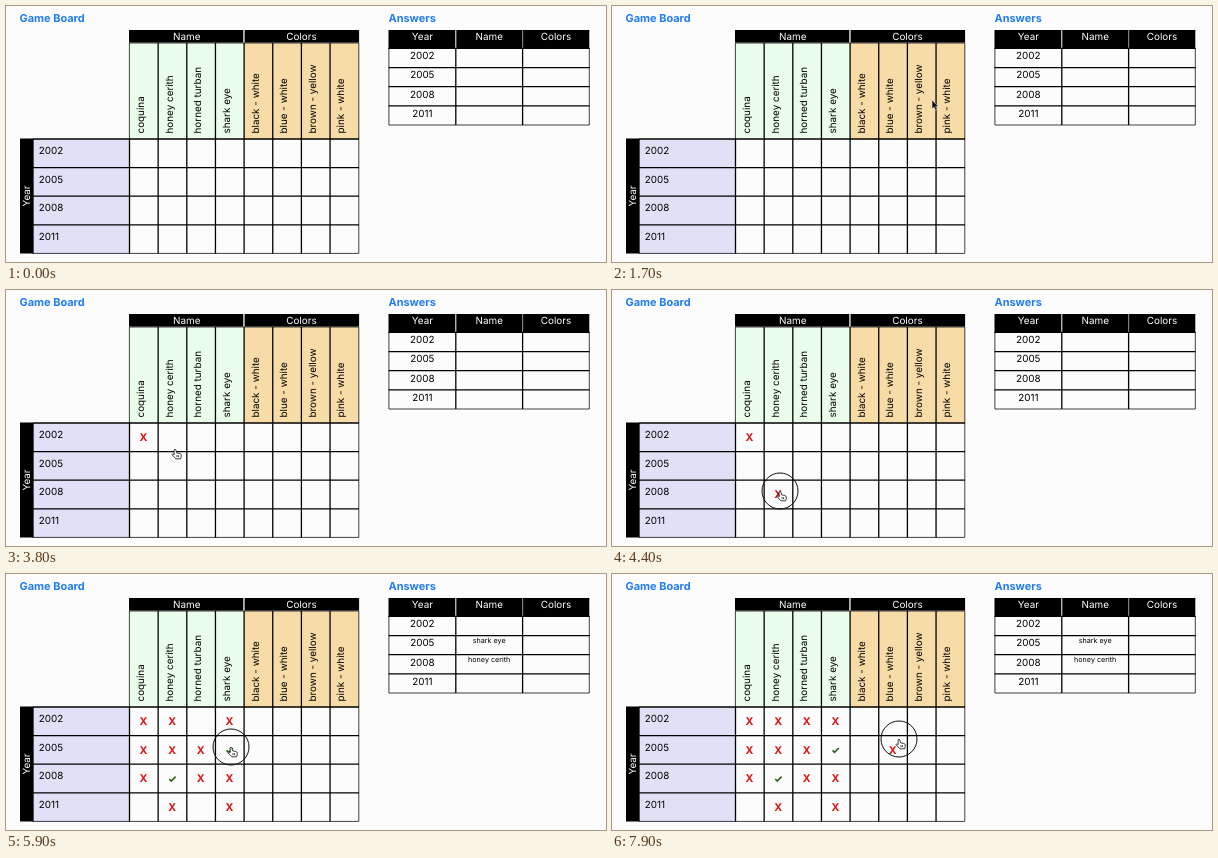
An HTML page for the animation above (8 s loop, 600 by 256 pixels).

```html
<!DOCTYPE html>
<html lang="en">
<head>
<meta charset="utf-8">
<title>Logic grid</title>
<style>
html, body { margin: 0; width: 100%; height: 100%; overflow: hidden; background: #fdfcfd; }
svg { display: block; width: 600px; height: 256px; }
text { font: 9.9px Inter, "Open Sans", sans-serif; fill: #000; text-rendering: geometricPrecision; }
.title { font-size: 10.95px; font-weight: 700; fill: #217cf3; }
.light { fill: #fff; }
.small { font-size: 7.2px; }
.cross { font-weight: 700; font-size: 10.7px; fill: #d81212; }
.mid { text-anchor: middle; }
.line { stroke: #000; stroke-width: 1.3; fill: none; }
.edge { stroke: #000; stroke-width: .75; fill: none; }
.tick { stroke: #286019; stroke-width: 1.6; fill: none; }
</style>
</head>
<body>
<svg viewBox="0 0 600 256">
  <g id="board"></g>
  <g id="marks"></g>
  <circle id="ring" r="18" fill="none" stroke="#111"/>
  <g id="cursor">
    <path id="arrow" d="M0 0v9l2-1.8 1.6 3.2 1.6-.8-1.5-3.1h2.9z" fill="#111" stroke="#fff" stroke-width=".5"/>
    <path id="hand" d="M-1 1q1-1.8 1.9 0l.6 2.8 3.4 .7q1.8 .5 1.4 2.8l-.7 2.5h-4.8l-3.7-4.1q0-1.5 2.2-.2zM2 6.2v2M3.6 6.2v2" fill="#fff" stroke="#111" stroke-width=".8"/>
  </g>
</svg>
<script>
const $ = id => document.getElementById(id);
const LOOP = 8000, STEP = 100, RING = 200;
const years = [2002, 2005, 2008, 2011];
const names = ['coquina', 'honey cerith', 'horned turban', 'shark eye'];
const colors = ['black - white', 'blue - white', 'brown - yellow', 'pink - white'];
const labels = [...names, ...colors];

const colX = c => 123.5 + 28.65 * c;
const rowY = r => 133 + 28.6 * r;
const answerX = c => 383 + 66.8 * c;
const answerY = r => 42.4 + 19.15 * r;

const text = (x, y, s, cls = '', turn = 0) =>
  `<text class="${cls}" transform="translate(${x} ${y}) rotate(${turn})">${s}</text>`;
const rect = (x, y, w, h, fill) =>
  `<rect x="${x}" y="${y}" width="${w}" height="${h}" fill="${fill}"/>`;
const line = (d, cls = 'line') => `<path class="${cls}" d="${d}"/>`;

function drawBoard() {
  let s = text(13.5, 15.6, 'Game Board', 'title') + text(382.5, 15.6, 'Answers', 'title');
  ['Name', 'Colors'].forEach((head, g) => {
    const x = colX(4 * g);
    s += rect(x, 37, 114.6, 96, g ? '#f8dca8' : '#eafdea');
    s += rect(x + (g ? .5 : -.5), 24, g ? 114.5 : 114.3, 12.6, '#000');
    s += text(x + 57.3, 34, head, 'light mid');
  });
  s += rect(27, 133, 96.5, 114.4, '#e0e0f6') + rect(14, 132.5, 13, 115, '#000');
  s += text(23.6, 190, 'Year', 'light mid', -90);
  labels.forEach((label, c) => s += text(colX(c) + 14.4, 127.5, label, '', -90));
  for (let c = 1; c < 8; c++) s += line(`M${colX(c)} 37V247.5`);
  for (let r = 0; r < 4; r++) s += line(`M27 ${rowY(r)}H353`);
  s += line('M27 133V247.5M123.5 133V247.5');
  s += line('M123.4 133V37H352.8V247.4H27', 'edge');

  ['Year', 'Name', 'Colors'].forEach((head, c) => {
    s += rect(answerX(c) + (c ? .5 : -.5), 24, c ? 66.2 : 66.8, 18.6, '#000');
    s += text(answerX(c) + 33.4, 34, head, 'light mid');
  });
  for (let c = 1; c < 3; c++) s += line(`M${answerX(c)} 42V119`);
  for (let r = 0; r < 4; r++) s += line(`M382.6 ${answerY(r)}H583.5`);
  s += line('M382.9 42V119H583.3V42', 'edge');
  years.forEach((year, r) => {
    s += text(32.7, rowY(r) + 15, year);
    s += text(416.3, answerY(r) + 10.8, year, 'mid');
  });
  $('board').innerHTML = s;
}

// Clicks: time, row, column. A second click on a cell confirms it.
const clicks = [[2700, 0, 0], [4300, 2, 1], [4600, 2, 1], [5500, 1, 3],
  [5800, 1, 3], [6900, 0, 2], [7800, 1, 5]];

function gridAt(t) {
  const grid = years.map(() => labels.map(() => ''));
  for (const [time, row, col] of clicks) {
    if (time > t) break;
    if (!grid[row][col]) { grid[row][col] = 'x'; continue; }
    const first = col - col % 4;
    for (let i = 0; i < 4; i++) grid[row][first + i] = grid[i][col] = 'x';
    grid[row][col] = 'ok';
  }
  return grid;
}

function drawMarks(t) {
  let s = '';
  gridAt(t).forEach((row, r) => row.forEach((mark, c) => {
    const x = colX(c) + 14, y = rowY(r) + 14.2;
    if (mark === 'x') s += text(x, y + 3.8, 'X', 'cross mid');
    if (mark === 'ok') {
      s += `<path class="tick" d="M${x - 2.9} ${y + .6}l2 2 4.3-4.4"/>`;
      s += text(answerX(c < 4 ? 1 : 2) + 33.4, answerY(r) + 7.2, labels[c], 'small mid');
    }
  }));
  $('marks').innerHTML = s;
}

// Pointer path: time, x, y
const path = [[1000, 372, 118], [1700, 320, 94], [2400, 140, 151], [2700, 138, 149],
  [3500, 140, 150], [3800, 169, 159], [4200, 168, 201], [4700, 168, 201],
  [5000, 204, 169], [5400, 225, 173], [6000, 225, 173], [6700, 202, 146],
  [7000, 198, 146], [7700, 287, 165], [8000, 287, 165]];

function pointerAt(t) {
  const i = path.findIndex(p => p[0] > t);
  const [t0, x0, y0] = path[i - 1], [t1, x1, y1] = path[i];
  const u = (t - t0) / (t1 - t0), e = u * u * (3 - 2 * u);
  return [x0 + (x1 - x0) * e, y0 + (y1 - y0) * e];
}

const show = (id, on) => $(id).setAttribute('visibility', on ? 'visible' : 'hidden');

function drawPointer(t) {
  const visible = t >= path[0][0];
  const [x, y] = visible ? pointerAt(t) : [0, 0];
  const overCell = x > 123 && x < 353 && y > 133;
  const at = `translate(${x} ${y})`;
  $('cursor').setAttribute('transform', at);
  $('ring').setAttribute('transform', at);
  show('arrow', visible && !overCell);
  show('hand', visible && overCell);
  show('ring', clicks.some(([time]) => t >= time && t < time + RING));
}

let last = -1;
function frame() {
  const t = Math.floor(performance.now() % LOOP / STEP) * STEP;
  if (t !== last) {
    drawMarks(t);
    drawPointer(t);
    last = t;
  }
  requestAnimationFrame(frame);
}

drawBoard();
frame();
</script>
</body>
</html>
```
